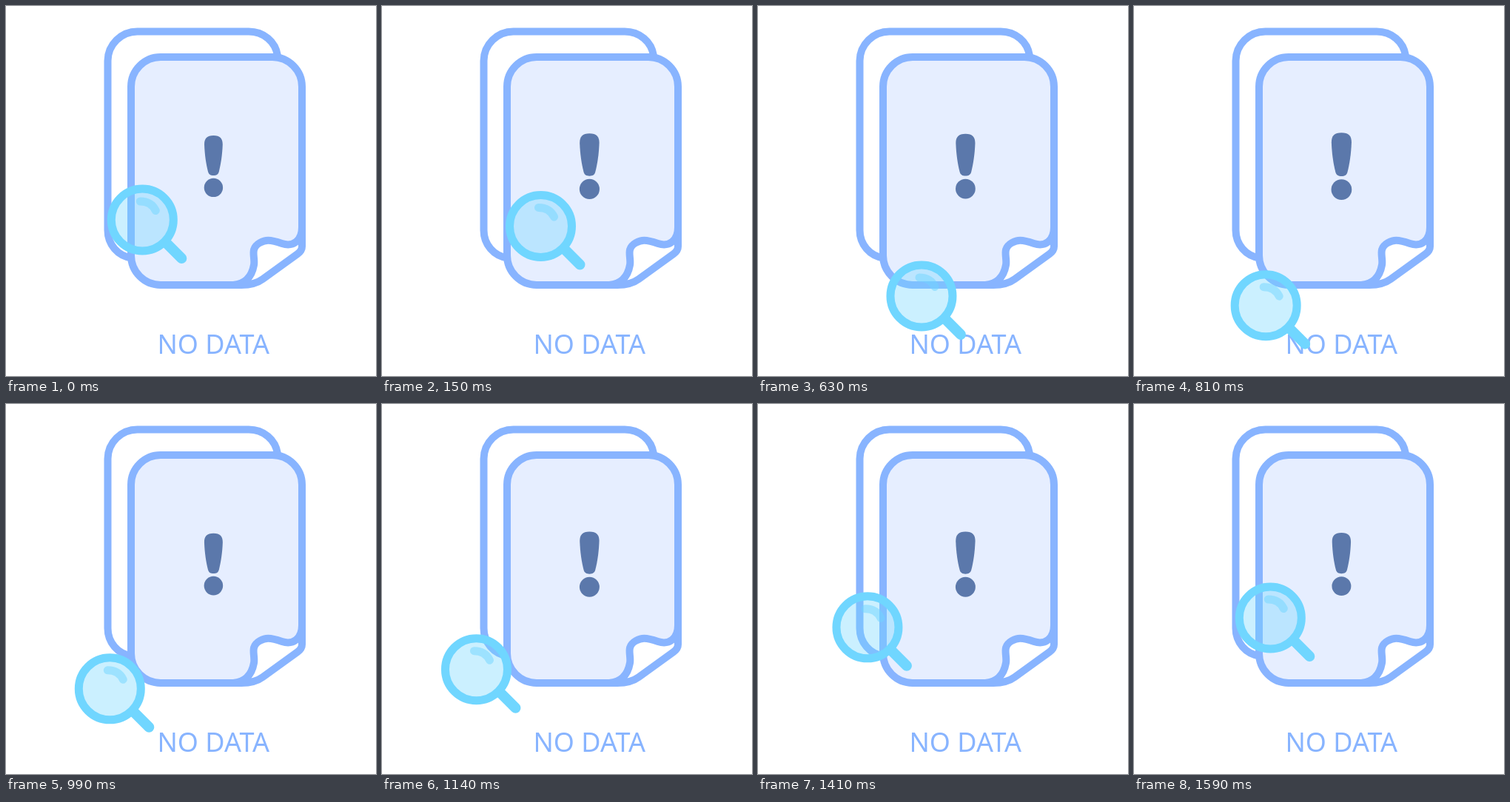
Recreate the animation shown at these times as an HTML page. Size 500x500 px, loop 1.62 s.

```html
<!DOCTYPE html>
<html lang="en">
<head>
<meta charset="utf-8">
<title>No data</title>
<style>
  html, body { margin: 0; width: 100%; height: 100%; overflow: hidden; background: #fff; }
  svg { display: block; width: 100vw; height: 100vh; }
  .line { fill: none; stroke: #88b4ff; stroke-width: 10; stroke-linejoin: round; }
  .lens { stroke: #70d6ff; stroke-linecap: round; }
  text { font: 36px "Noto Sans", "Open Sans", sans-serif; fill: #88b4ff; }
</style>
</head>
<body>
<svg viewBox="0 0 500 500">
  <path class="line" d="M170 340.5C151 338 137.500 322 137.500 303V74A40 40 0 0 1 177.500 34.500H328C348 34.500 364 48 367 67"/>

  <path fill="#e6eeff" d="M209 69H360A40 40 0 0 1 400 109V299C400 317 388 326 373 321C356 315 350 316 343 320C329 328 337 339 335 350C332 367 322 376 307 377H209A40 40 0 0 1 169 337V109A40 40 0 0 1 209 69Z"/>
  <path class="line" d="M400 299V325C400 329 398 332 394 335L347 369C339 375 329 377 318 377H209A40 40 0 0 1 169 337V109A40 40 0 0 1 209 69H360A40 40 0 0 1 400 109V299C400 317 388 326 373 321C356 315 350 316 343 320C329 328 337 339 335 350C332 367 322 376 307 377"/>

  <g id="mark" fill="#5b78ab">
    <path d="M0 -42C9 -42 12.500 -38 12.500 -30C12 -15 10 -3 7.500 7C6.500 11 4 12.300 0 12.300C-4 12.300 -6.500 11 -7.500 7C-10 -3 -12 -15 -12.500 -30C-12.500 -38 -9 -42 0 -42Z"/>
    <circle cy="29" r="12.800"/>
  </g>

  <text x="204.500" y="469.500">NO DATA</text>

  <g id="lens" class="lens" fill="none">
    <path d="M32 31L53 52" stroke-width="14"/>
    <circle r="42" fill="#70d6ff" fill-opacity=".36" stroke-width="11"/>
    <path d="M-3 -25Q12 -25 18 -12.500" stroke-width="11" stroke-opacity=".5"/>
  </g>
</svg>
<script>
  const LOOP = 1620, STEP = 30, PULSE = 500;

  // [ms, degrees] around the orbit
  const orbit = [[0, -90], [150, -58.1], [390, -10.9], [630, 51.4],
                 [990, 138.6], [1080, 153.8], [1260, 196.1], [1590, 270], [1620, 270]];
  // [ms, height] of the exclamation mark
  const pulse = [[0, 83], [90, 85], [150, 88.7], [260, 91], [390, 89], [500, 83]];

  const lens = document.getElementById('lens');
  const mark = document.getElementById('mark');

  // Smooth interpolation through unevenly spaced keys
  function sample(keys, t) {
    let i = 0;
    while (i < keys.length - 2 && t >= keys[i + 1][0]) i++;
    const slope = k => {
      const a = keys[Math.max(k - 1, 0)], b = keys[Math.min(k + 1, keys.length - 1)];
      return (b[1] - a[1]) / (b[0] - a[0]);
    };
    const [t0, v0] = keys[i], [t1, v1] = keys[i + 1];
    const d = t1 - t0, u = (t - t0) / d, w = 1 - u;
    if (v0 === v1) return v0;
    return w * w * ((1 + 2 * u) * v0 + u * d * slope(i))
         + u * u * ((1 + 2 * w) * v1 - w * d * slope(i + 1));
  }

  function draw(t) {
    const a = sample(orbit, t) * Math.PI / 180;
    const r = 58 + Math.sin(a);
    const x = 184.3 + r * Math.cos(a), y = 346 + r * Math.sin(a);
    const s = sample(pulse, t % PULSE) / 83.8;
    lens.setAttribute('transform', `translate(${x.toFixed(2)} ${y.toFixed(2)})`);
    mark.setAttribute('transform', `translate(280.4 216.7) scale(${s.toFixed(4)})`);
  }

  const start = performance.now();
  function tick() {
    const t = (performance.now() - start) % LOOP;
    draw(Math.floor(t / STEP) * STEP);
    requestAnimationFrame(tick);
  }
  draw(0);
  requestAnimationFrame(tick);
</script>
</body>
</html>
```
